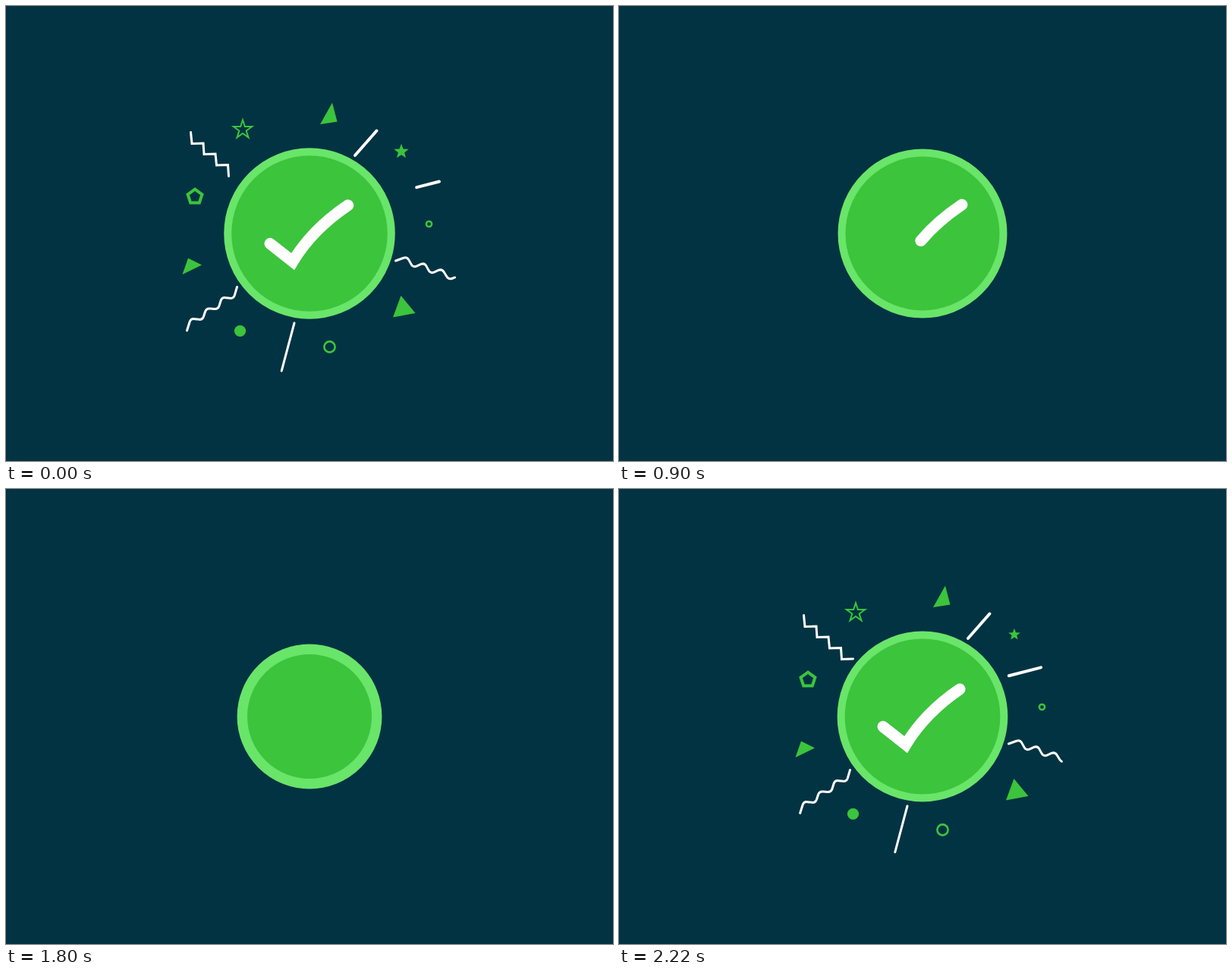
Recreate the animation shown at these times as an HTML page. Size 800x600 px, loop 2.25 s.

```html
<!DOCTYPE html>
<html lang="en">
<head>
<meta charset="utf-8">
<title>Success burst</title>
<style>
  html, body { margin: 0; width: 100%; height: 100%; overflow: hidden; background: #013342; }
  svg { display: block; width: 100%; height: 100%; }
</style>
</head>
<body>
<svg id="stage" viewBox="0 0 800 600"></svg>
<script>
const LOOP = 2250, START = 570, STEP = 30;
const GREEN = '#3cc43c', LIGHT = '#69e569', WHITE = '#fff';
const stage = document.getElementById('stage');

const clamp = x => Math.min(1, Math.max(0, x));
const progress = (t, start, duration) => clamp((t - start) / duration);
const quadIn = p => p * p;
const quadOut = p => 1 - (1 - p) ** 2;
const quadInOut = p => p < .5 ? 2 * p * p : 1 - 2 * (1 - p) ** 2;
const cubicOut = p => 1 - (1 - p) ** 3;
const elasticOut = (t, duration, period) =>
  t <= 0 ? 0 : 1 - 2 ** (-10 * t / duration) * Math.cos(2 * Math.PI * t / period);

function add(tag, attrs) {
  const el = document.createElementNS('http://www.w3.org/2000/svg', tag);
  set(el, attrs);
  return stage.appendChild(el);
}
function set(el, attrs) {
  for (const name in attrs) el.setAttribute(name, attrs[name]);
}

// Regular polygon, or a star when the inner ratio is given, around the origin.
function polygon(corners, radius, innerRatio) {
  const count = innerRatio ? corners * 2 : corners;
  return Array.from({ length: count }, (_, i) => {
    const r = innerRatio && i % 2 ? radius * innerRatio : radius;
    const a = 2 * Math.PI * i / count - Math.PI / 2;
    return [r * Math.cos(a), r * Math.sin(a)];
  });
}

// Polyline whose corners are cut back by a radius and curved.
function roundedPath(points, radius) {
  const toward = ([x, y], [u, v]) => {
    const k = radius / Math.hypot(u - x, v - y);
    return [x + (u - x) * k, y + (v - y) * k];
  };
  const inner = points.slice(1, -1).map((p, i) =>
    `L${toward(p, points[i])}Q${p} ${toward(p, points[i + 2])}`);
  return `M${points[0]}${inner.join('')}L${points.at(-1)}`;
}

// Strokes that grow from their start, then are erased from their start.
function stroke(d, width, enter, leave, reach = 1) {
  const el = add('path', {
    d, fill: 'none', stroke: WHITE, 'stroke-width': width,
    'stroke-linecap': 'round', 'stroke-miterlimit': 10, pathLength: 1
  });
  return t => {
    const tail = leave(t);
    const head = Math.min(1, reach * enter(t) + tail);
    const visible = head - tail > .001;
    set(el, {
      visibility: visible ? 'visible' : 'hidden',
      'stroke-dasharray': `${Math.max(.001, head - tail)} 3`,
      'stroke-dashoffset': -tail
    });
  };
}
const ray = (d, width, start, end, reach, duration = 240) => stroke(d, width,
  t => cubicOut(progress(t, start, duration)),
  t => cubicOut(progress(t, end, 160)), reach);

// Small shapes that pop in and shrink away around their centre.
function shape(x, y, start, end, tag, attrs, outline) {
  const paint = outline
    ? { fill: 'none', stroke: GREEN, 'stroke-width': outline, 'stroke-miterlimit': 8 }
    : { fill: GREEN };
  const el = add(tag, { ...attrs, ...paint });
  return t => {
    const scale = quadOut(progress(t, start, 165)) * (1 - quadIn(progress(t, end, 165)));
    set(el, { transform: `translate(${x} ${y}) scale(${scale})` });
  };
}
const poly = (x, y, start, end, points, outline) =>
  shape(x, y, start, end, 'polygon', { points: points.join(' ') }, outline);
const disc = (x, y, start, end, r, outline) =>
  shape(x, y, start, end, 'circle', { r }, outline);

function badge() {
  const el = add('circle', { cx: 400, cy: 300, fill: GREEN, stroke: LIGHT });
  return t => {
    const shrink = 1 - quadIn(progress(t, 1485, 165));
    const rim = 10 + 10 * (1 - cubicOut(progress(t, 45, 250)));
    const scale = Math.max(0, elasticOut(t - 45, 860, 374)) * shrink;
    set(el, { r: 106.5 * scale, 'stroke-width': scale ? rim * shrink : 0 });
  };
}

const zigzag = 'M308.5 224L293.5 224.5L292.5 209.5L277.5 210L276 195L261 195.5L260 181L245 181.5L243.5 166.5';
const leftWave = [[304.5, 370.5], [300, 386], [284.5, 384], [279.5, 400],
  [264, 398.5], [259, 414], [243.5, 412], [238.5, 428]];
const rightWave = [[513.5, 336], [528.5, 330.5], [536.5, 345], [551.5, 338.5],
  [559.5, 353], [574.5, 346.5], [583.5, 361], [598, 355.5]];

const parts = [
  ray('M460 197L503.5 147.4', 4, 310, 580, .655),
  ray('M507 248L571 231.5', 4, 150, 534, .66),
  ray('M380 418L363 482', 3, 397, 620, 1, 225),
  ray(zigzag, 3, 305, 563),
  ray(roundedPath(leftWave, 5), 3, 343, 600),
  ray(roundedPath(rightWave, 5), 3, 427, 670),

  poly(425, 142, 255, 880, [[5, -14.5], [11.5, 10.5], [-11, 14]]),
  poly(524.7, 396.5, 325, 970, [[-4.2, -14.5], [14.8, 8.5], [-14.7, 14]]),
  poly(245, 343, 380, 990, [[-5, -10.5], [13, -1.5], [-12.5, 11]]),
  poly(312, 163, 325, 942, polygon(5, 12.8, .382), 2),
  poly(521, 192, 468, 1130, polygon(5, 12, .42)),
  poly(249, 251.5, 325, 1042, polygon(5, 9.9), 4),
  disc(426.5, 449.5, 255, 882, 7.1, 2.6),
  disc(557.5, 287.5, 370, 1110, 3.6, 2.5),
  disc(308.5, 428.5, 370, 995, 7.6),

  badge(),
  stroke('M348 313.3L378 337Q404 294 452 262', 15,
    t => cubicOut(progress(t, 247, 412)),
    t => quadInOut(progress(t, 1370, 200)))
];

function frame() {
  const t = (Math.floor(performance.now() / STEP) * STEP + START) % LOOP;
  parts.forEach(draw => draw(t));
  requestAnimationFrame(frame);
}
frame();
</script>
</body>
</html>
```
